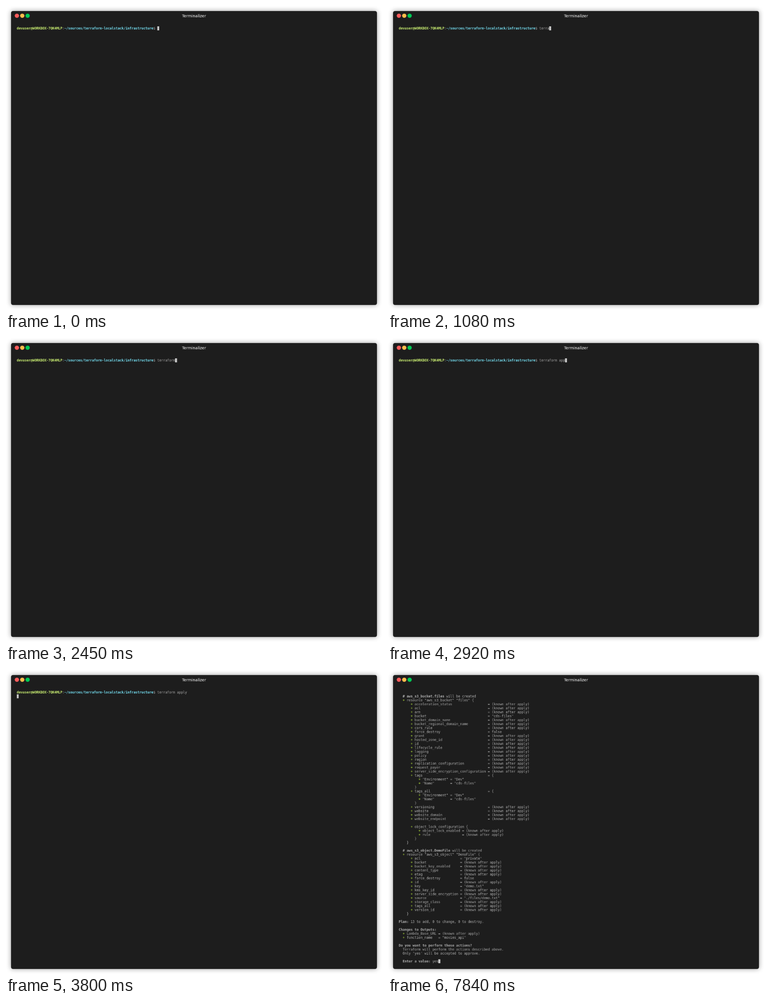
An HTML page with a canvas that plays this animation: 832 by 673 pixels, repeating every 8000 ms.

```html
<!DOCTYPE html>
<html lang="en">
<head>
<meta charset="utf-8">
<title>Terminal</title>
<style>
  html, body { margin: 0; width: 100%; height: 100%; overflow: hidden; background: #fff; }
  canvas { display: block; width: 832px; height: 673px; }
</style>
</head>
<body>
<canvas id="stage" width="832" height="673"></canvas>
<script>
const LOOP = 8000;
const CELL_W = 7, CELL_H = 14, LEFT = 38, TOP = 72;
const FG = '#afafaf', GREEN = '#b3e33b', BRIGHT_GREEN = '#c8ed71', BLUE = '#75dff2';

const USER = 'devuser@WORKBOX-7QK4MLP';
const PATH = '~/sources/terraform-localstack/infrastructure';
const COMMAND = 'terraform apply';
const ANSWER = 'yes';
const COMMAND_TIMES = [500, 620, 740, 930, 1080, 2050, 2160, 2330, 2450, 2580, 2730, 2820, 2920, 3110, 3230];
const ENTER_TIME = 3800;
const ANSWER_TIMES = [7620, 7690, 7840];

// One "+ name = value" line per entry, padded to the longest name.
function attributes(indent, list) {
  const entries = list.trim().split(/\s+/).map(entry => entry.split('='));
  const width = Math.max(...entries.map(([name]) => name.length));
  return entries.map(([name, value = '(known after apply)']) =>
    ' '.repeat(indent) + '+ ' + name.padEnd(width) + ' = ' +
    (value === 'TAGS' ? '{\n' + attributes(10, '"Environment"="Dev" "Name"="cds-files"') + '\n        }' : value)
  ).join('\n');
}

// Asterisks enclose bold text.
const PLAN = `
  *# aws_s3_bucket.files* will be created
  + resource "aws_s3_bucket" "files" {
${attributes(6, `acceleration_status acl arn bucket="cds-files" bucket_domain_name
  bucket_regional_domain_name cors_rule force_destroy=false grant hosted_zone_id id
  lifecycle_rule logging policy region replication_configuration request_payer
  server_side_encryption_configuration tags=TAGS tags_all=TAGS
  versioning website website_domain website_endpoint`)}

      + object_lock_configuration {
${attributes(10, 'object_lock_enabled rule')}
        }
    }

  *# aws_s3_object.DemoFile* will be created
  + resource "aws_s3_object" "DemoFile" {
${attributes(6, `acl="private" bucket bucket_key_enabled content_type etag force_destroy=false id
  key="demo.txt" kms_key_id server_side_encryption source="./files/demo.txt"
  storage_class tags_all version_id`)}
    }

*Plan:* 13 to add, 0 to change, 0 to destroy.

*Changes to Outputs:*
${attributes(2, 'Lambda_Base_URL function_name="movies_api"')}

*Do you want to perform these actions?*
  Terraform will perform the actions described above.
  Only 'yes' will be accepted to approve.

  *Enter a value:* `.split('\n');

const stage = document.getElementById('stage').getContext('2d');
stage.imageSmoothingQuality = 'high';

// The window is drawn at full size and scaled down to the stage.
const screen = document.createElement('canvas');
screen.width = 1330;
screen.height = 1076;
const ctx = screen.getContext('2d');

function print(row, col, text, color = FG, bold = false) {
  ctx.fillStyle = color;
  ctx.font = `${bold ? 'bold ' : ''}12px "DejaVu Sans Mono", monospace`;
  for (const char of text) ctx.fillText(char, LEFT + col++ * CELL_W, TOP + row * CELL_H + 11);
  return col;
}

function drawCursor(row, col) {
  ctx.fillStyle = '#c7c7c7';
  ctx.fillRect(LEFT + col * CELL_W, TOP + row * CELL_H, CELL_W, CELL_H);
}

function drawWindow() {
  ctx.fillStyle = '#fff';
  ctx.fillRect(0, 0, screen.width, screen.height);
  ctx.save();
  ctx.shadowColor = 'rgba(0, 0, 0, 0.4)';
  ctx.shadowBlur = 18;
  ctx.fillStyle = '#1d1d1d';
  ctx.beginPath();
  ctx.roundRect(18, 18, 1294, 1040, 6);
  ctx.fill();
  ctx.restore();
  ['#ff5c5c', '#ffbd4c', '#00ca56'].forEach((color, i) => {
    ctx.fillStyle = color;
    ctx.beginPath();
    ctx.arc(38.5 + i * 19, 34.5, 7.5, 0, 2 * Math.PI);
    ctx.fill();
  });
  ctx.fillStyle = '#fff';
  ctx.font = '14px "DejaVu Sans", sans-serif';
  ctx.textAlign = 'center';
  ctx.fillText('Terminalizer', 665, 40);
  ctx.textAlign = 'left';
}

const typed = (text, times, t) => text.slice(0, times.filter(time => time <= t).length);

function drawPrompt(t) {
  let col = print(0, 0, USER, BRIGHT_GREEN, true);
  col = print(0, col, ':');
  col = print(0, col, PATH, BLUE, true);
  col = print(0, col, '$ ' + typed(COMMAND, COMMAND_TIMES, t));
  if (t < ENTER_TIME) drawCursor(0, col);
  else drawCursor(1, 0);
}

function drawPlan(t) {
  let col;
  PLAN.forEach((line, row) => {
    col = 0;
    line.split('*').forEach((part, i) => {
      const [, plus, rest] = part.match(/^( *\+ )?(.*)$/);
      col = print(row, col, plus || '', GREEN);
      col = print(row, col, rest, FG, i % 2 === 1);
    });
  });
  const last = PLAN.length - 1;
  drawCursor(last, print(last, col, typed(ANSWER, ANSWER_TIMES, t)));
}

function frame() {
  const t = performance.now() % LOOP;
  drawWindow();
  if (t < ANSWER_TIMES[0]) drawPrompt(t);
  else drawPlan(t);
  stage.drawImage(screen, 0, 0, 832, 673);
  requestAnimationFrame(frame);
}
frame();
</script>
</body>
</html>
```
